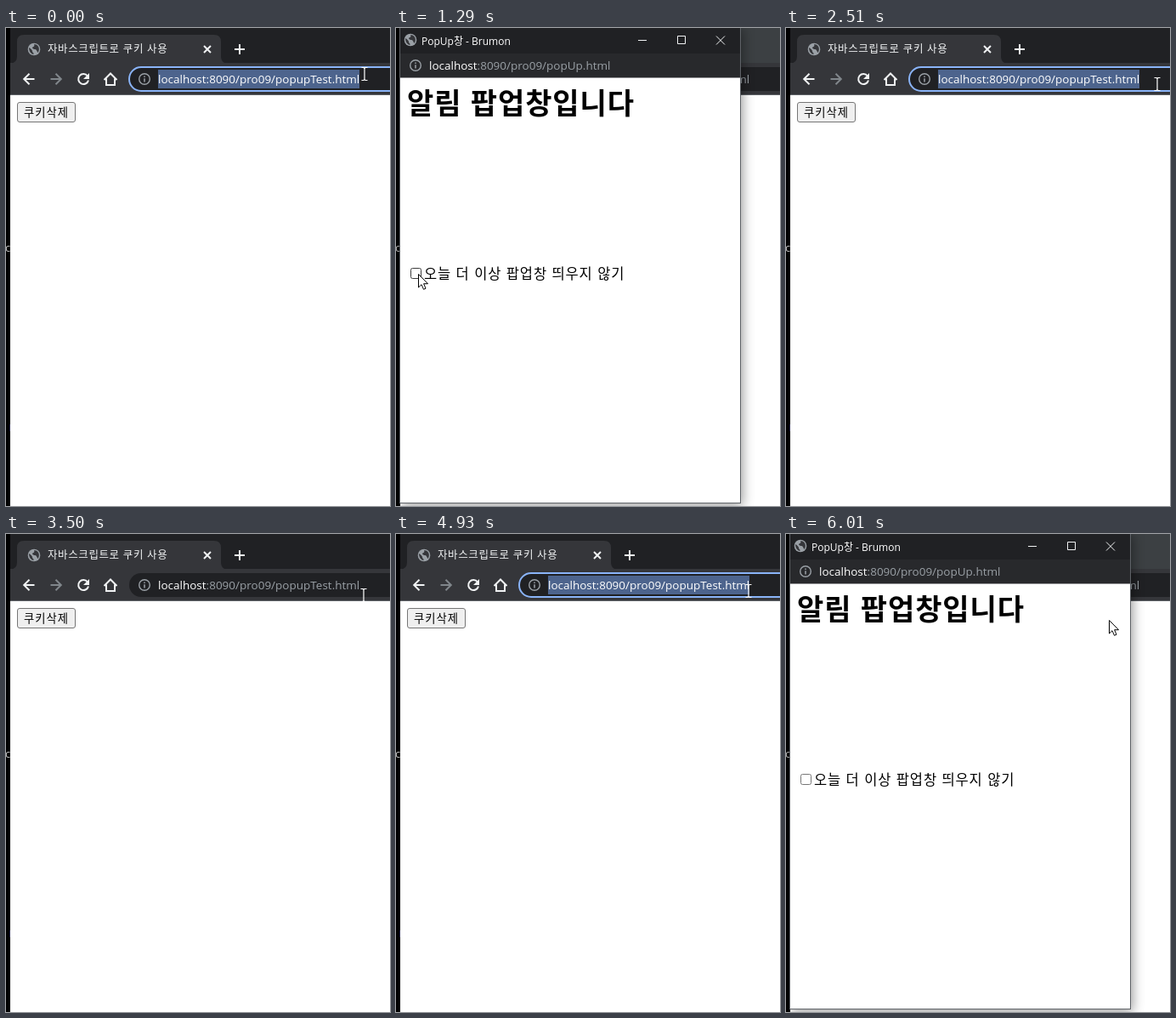
An HTML page for the animation above (6.08 s loop, 452 by 562 pixels).

```html
<!DOCTYPE html>
<html lang="ko">
<head>
<meta charset="utf-8">
<title>자바스크립트로 쿠키 사용</title>
<style>
  html, body { margin: 0; width: 100%; height: 100%; overflow: hidden; background: #000; }
  svg { display: block; }
  text { font-family: "Open Sans", "Noto Sans CJK KR", "Noto Sans CJK", sans-serif; white-space: pre; }
  .ko { font-family: "Noto Sans CJK KR", "Noto Sans CJK", sans-serif; }
  .url { font-size: 13.5px; fill: #9aa0a6; }
  .url .host { fill: #fff; }
  .line { fill: none; stroke: #f1f3f4; stroke-width: 2; }
  .thin { fill: none; stroke: #f1f3f4; stroke-width: 1; }
  .selected .url, .selected .host { fill: #fff; }
  #selection, #ring { visibility: hidden; }
  .selected #selection, .focused #ring { visibility: visible; }
  #strip { fill: #202124; }
  .inactive #strip { fill: #3c4043; }
  .inactive #tab { opacity: .75; }
  #popup { filter: drop-shadow(2px 3px 7px rgba(0, 0, 0, .4)); }
  #check { display: none; }
  .checked #check { display: inline; }
</style>
</head>
<body>
<svg width="452" height="562" viewBox="0 0 452 562">
  <defs>
    <g id="globe">
      <circle r="7.3" fill="#9aa0a6"/>
      <path d="M-6-2C-3 0-2 1-2 2.500S0 4-.5 6C-4 5.500-6 2-6-2ZM0-6C1-4 0-3-1.500-2.500S-1 0 1 0 3 2 4.500 4C7 1 6-4 2.500-5.500Z" fill="#35363a"/>
    </g>
    <g id="info">
      <circle r="6.300" fill="none" stroke="#9aa0a6" stroke-width="1.400"/>
      <path d="M0-3.500V-2M0-.8V3.500" stroke="#9aa0a6" stroke-width="1.500"/>
    </g>
    <path id="arrow" d="M6.500 0H-6M.5-6.300L-5.800 0 .5 6.300"/>
  </defs>

  <rect width="452" height="562" fill="#000"/>
  <text x="-1" y="263" font-size="13" fill="#c8c8c8">c</text>
  <path d="M4.500 466v8" stroke="#26264a"/>

  <g id="page">
    <rect id="strip" x="5" width="447" height="42"/>
    <g id="tab">
      <path d="M5 41.500Q13 41.500 13 33V16Q13 8 21 8H245Q253 8 253 16V33Q253 41.500 261 41.500Z" fill="#35363a"/>
      <use href="#globe" x="33" y="25"/>
      <text class="ko" x="49" y="29" font-size="12.5" letter-spacing=".6" fill="#f1f3f4">자바스크립트로 쿠키 사용</text>
      <path class="line" d="M233 21l8 8m0-8l-8 8"/>
      <path class="line" d="M275 19v12m-6-6h12"/>
    </g>
    <rect x="5" y="41" width="447" height="37" fill="#35363a"/>
    <rect x="5" y="78" width="447" height="1" fill="#5f6368"/>
    <use href="#arrow" x="27" y="60" class="line"/>
    <use href="#arrow" class="line" transform="translate(59 60) scale(-1 1)" style="stroke:#80868b"/>
    <path class="line" d="M96 56.500A6 6 0 1 0 97 61.500"/>
    <path d="M98 53v7h-7Z" fill="#f1f3f4"/>
    <path class="line" d="M115.500 61L123 53.500 130.500 61M118 59.500V67H128V59.500"/>
    <rect x="145" y="46" width="340" height="28" rx="14" fill="#202124"/>
    <rect id="ring" x="145" y="46" width="340" height="28" rx="14" fill="none" stroke="#8ab4f8" stroke-width="2"/>
    <use href="#info" x="163" y="60"/>
    <rect id="selection" x="179" y="49" width="237" height="22" fill="#4d648d"/>
    <text class="url" x="179" y="65"><tspan class="host">localhost</tspan>:8090/pro09/popupTest.html</text>
    <rect x="5" y="79" width="447" height="483" fill="#fff"/>
    <rect id="button" x="13.500" y="87.500" width="68" height="23" rx="2.500" fill="#efefef" stroke="#767676"/>
    <text class="ko" x="21" y="104" font-size="13.3" letter-spacing="1" fill="#000">쿠키삭제</text>
  </g>

  <g id="popup">
    <rect x="4" y="-2" width="402" height="561" fill="#5f6368"/>
    <rect x="5" y="-1" width="400" height="31" fill="#202124"/>
    <rect x="5" y="30" width="400" height="29" fill="#28292c"/>
    <rect x="5" y="58.500" width="400" height="499.500" fill="#fff"/>
    <use href="#globe" x="17" y="14"/>
    <text x="30" y="19.500" font-size="12" fill="#fff">PopUp창 - Brumon</text>
    <path class="thin" d="M285 14.500h10M331.500 9.500h9v9h-9ZM377 9.500l10 10m0-10l-10 10"/>
    <use href="#info" x="23" y="44"/>
    <text class="url" x="39" y="49"><tspan class="host">localhost</tspan>:8090/pro09/popUp.html</text>
    <text class="ko" x="13" y="101" font-size="34" font-weight="700" letter-spacing=".9">알림 팝업창입니다</text>
    <rect id="box" x="17.500" y="282.500" width="12" height="12" rx="2" fill="#fff" stroke="#767676"/>
    <g id="check">
      <rect x="17" y="282" width="13" height="13" rx="2" fill="#0075ff"/>
      <path d="M19.500 288.500l3 3 5-6" fill="none" stroke="#fff" stroke-width="2"/>
    </g>
    <text class="ko" x="33" y="295" font-size="16.5" letter-spacing=".88">오늘 더 이상 팝업창 띄우지 않기</text>
  </g>

  <circle id="click" r="13" fill="#fff000" fill-opacity=".6"/>
  <g id="cursor">
    <path id="pointer" d="M-.5-.5V15L3 11.700 5.500 17.300 8 16.200 5.600 10.700H10.500Z" fill="#fff" stroke="#000"/>
    <path id="beam" d="M-3.500-7.500H-1L0-6.500 1-7.500H3.500M0-6.500V6.500M-3.500 7.500H-1L0 6.500 1 7.500H3.500" fill="none" stroke="#fff" stroke-width="1.200"/>
  </g>
</svg>
<script>
const LOOP = 6080;
const byId = id => document.getElementById(id);
const [page, popup, cursor, pointer, beam, click, box, button] =
  ["page", "popup", "cursor", "pointer", "beam", "click", "box", "button"].map(byId);

const moves = [
  { start: 940, end: 1290, steps: 6, to: [27, 290] },
  { start: 1760, end: 2100, steps: 6, to: [285, 93] },
  { start: 2170, end: 2510, steps: 6, to: [437, 66] },
  { start: 3500, end: 3970, steps: 8, to: [55, 108], bow: 33 },
  { start: 4310, end: 4790, steps: 8, to: [416, 62] },
  { start: 4860, end: 5000, steps: 3, to: [415, 69] },
  { start: 5880, end: 6010, steps: 3, to: [381, 102] }
];
const clicks = [[1550, 1690], [2310, 2440], [4040, 4240], [4860, 4930]];

const within = (t, from, to) => t >= from && t < to;
const smooth = p => p * p * (3 - 2 * p);
const show = (el, on) => el.style.visibility = on ? "visible" : "hidden";

function stepAt(t, start, end, steps) {
  if (t < start) return -1;
  const gap = (end - start) / (steps - 1);
  return Math.min(steps - 1, Math.floor((t - start + 8) / gap));
}

function cursorAt(t) {
  let [x, y] = [422, 54];
  for (const { start, end, steps, to, bow = 0 } of moves) {
    if (t < start) break;
    const p = (stepAt(t, start, end, steps) + 1) / steps;
    const e = smooth(p);
    x += (to[0] - x) * e;
    y += (to[1] - y) * e + bow * Math.sin(Math.PI * e);
  }
  return [x, y];
}

function popupAlpha(t) {
  if (t >= 5200) return [0, .12, .46, .77, .92, .98, 1][stepAt(t, 5200, 5620, 7)];
  if (t >= 1690) return [.75, .4, .12, 0][stepAt(t, 1690, 1900, 4)];
  if (t >= 340) return [0, .32, .67, .87, .96, 1][stepAt(t, 340, 680, 6)];
  return 0;
}

function draw(t) {
  const alpha = popupAlpha(t);
  const zoom = 1 - .066 * (1 - alpha);
  show(popup, alpha > 0);
  popup.setAttribute("opacity", alpha);
  popup.setAttribute("transform", `translate(205 278) scale(${zoom}) translate(-205 -278)`);
  popup.classList.toggle("checked", within(t, 1620, 1900));
  box.setAttribute("stroke", within(t, 1290, 1900) ? "#3c3c3c" : "#767676");

  const selected = t < 340 || within(t, 2380, 2970) || within(t, 4930, 5200);
  page.classList.toggle("selected", selected);
  page.classList.toggle("focused", selected || within(t, 2310, 2380) || within(t, 4860, 4930));
  page.classList.toggle("inactive", within(t, 340, 1690) || t >= 5200);
  const pressed = within(t, 4040, 4240);
  button.setAttribute("fill", pressed ? "#f5f5f5" : "#efefef");
  button.setAttribute("stroke", pressed ? "#8d8d8d" : "#767676");

  const [x, y] = cursorAt(t);
  const place = `translate(${Math.round(x)} ${Math.round(y)})`;
  const overAddress = y > 45 && y < 75 && x > 144 && (x > 406 || t > 2100) && t < 5000;
  cursor.setAttribute("transform", place);
  click.setAttribute("transform", place);
  show(beam, overAddress);
  show(pointer, !overAddress);
  show(click, clicks.some(([from, to]) => within(t, from, to)));
}

const origin = performance.now();
function tick() {
  draw((performance.now() - origin) % LOOP);
  requestAnimationFrame(tick);
}
draw(0);
requestAnimationFrame(tick);
</script>
</body>
</html>
```
